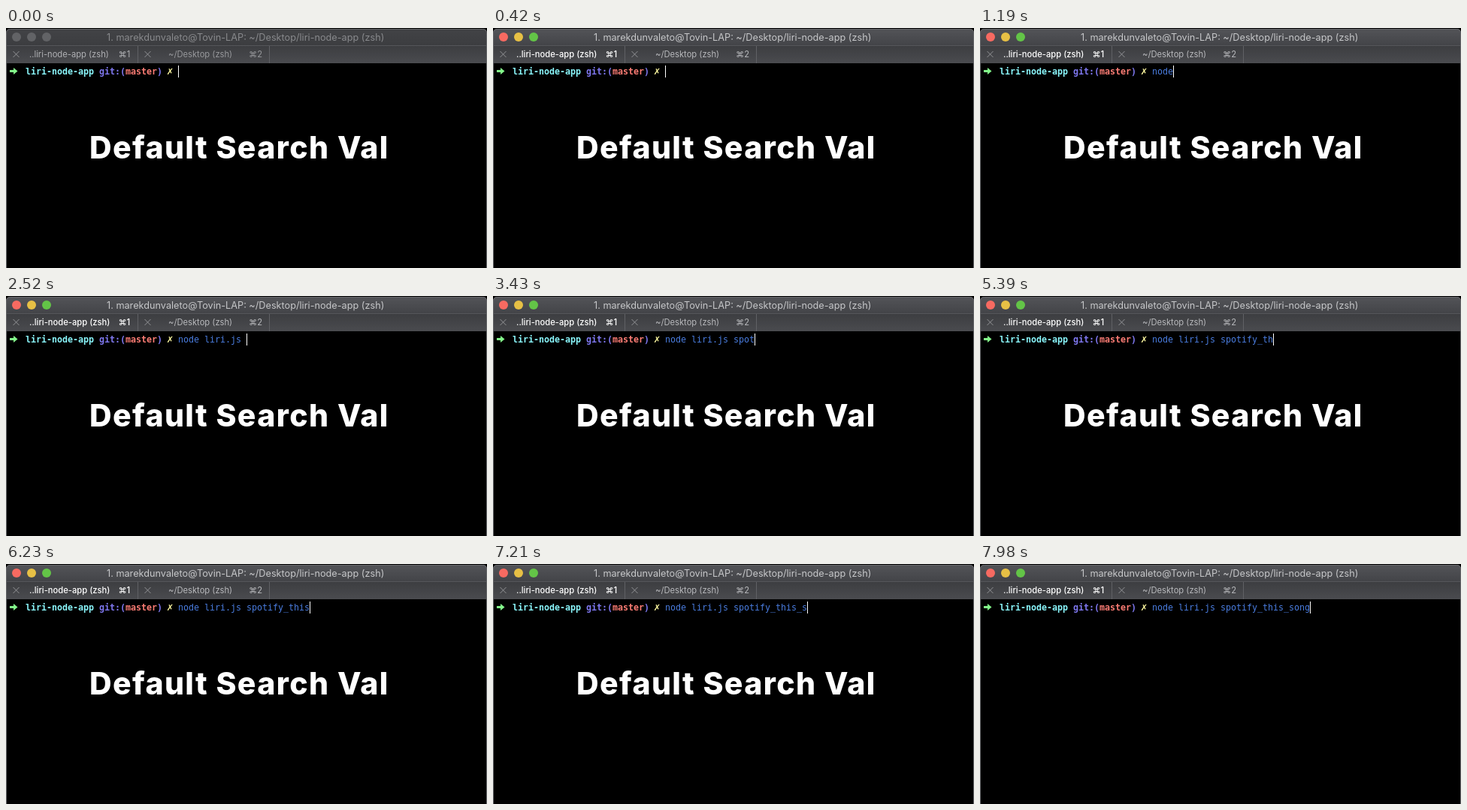
These frames come from a looping animation (640x320 px, 8 s). An HTML page with a canvas:

```html
<!DOCTYPE html>
<html lang="en">
<head>
<meta charset="utf-8">
<title>Terminal</title>
<style>
html, body { margin: 0; width: 100%; height: 100%; overflow: hidden; background: #000; }
canvas { display: block; width: 640px; height: 320px; }
</style>
</head>
<body>
<canvas id="stage" width="640" height="320"></canvas>
<script>
const ctx = document.getElementById('stage').getContext('2d');
const LOOP = 8000, FOCUS = 350, CAPTION_END = 7630;
const UI = 'Inter, "Open Sans", sans-serif';
const MONO = '"DejaVu Sans Mono", monospace';
const LEFT = 5, CELL = 7, BASE = 62;

const command = 'node liri.js spotify_this_song';
const keyTimes = [
  770, 910, 1050, 1190, 1400,
  1540, 1610, 1750, 1820, 1960, 2100, 2170, 2520,
  2940, 3150, 3290, 3430, 3640, 3850, 4060, 4410,
  4760, 5180, 5670, 6020, 6580, 7210, 7350, 7490, 7630
];

// column, text, colour
const prompt = [
  [3, 'liri-node-app', '#8af6fb'],
  [17, 'git:(', '#7f78f0'],
  [22, 'master', '#fb7c74'],
  [28, ')', '#7f78f0']
];

function rect(x, y, w, h, fill) {
  ctx.fillStyle = fill;
  ctx.fillRect(x, y, w, h);
}

function shade(y, h, top, bottom) {
  const g = ctx.createLinearGradient(0, y, 0, y + h);
  g.addColorStop(0, top);
  g.addColorStop(1, bottom);
  rect(0, y, 640, h, g);
}

function text(str, x, y, font, fill, spacing = 0) {
  ctx.font = font;
  ctx.letterSpacing = spacing + 'px';
  ctx.fillStyle = fill;
  ctx.fillText(str, x, y);
}

function mono(col, str, fill, weight) {
  const font = weight + ' 11.63px ' + MONO;
  [...str].forEach((ch, i) => text(ch, LEFT + (col + i) * CELL, BASE, font, fill));
}

function closeMark(x, y) {
  ctx.strokeStyle = '#929396';
  ctx.lineWidth = 1;
  ctx.beginPath();
  ctx.moveTo(x - 4, y - 4);
  ctx.lineTo(x + 4, y + 4);
  ctx.moveTo(x + 4, y - 4);
  ctx.lineTo(x - 4, y + 4);
  ctx.stroke();
}

function titleBar(active) {
  if (active) shade(1, 22, '#535458', '#434448');
  else shade(1, 22, '#424346', '#3c3d40');

  const lights = active ? ['#f76a61', '#e7c045', '#63c447'] : Array(3).fill('#626366');
  lights.forEach((c, i) => {
    ctx.fillStyle = c;
    ctx.beginPath();
    ctx.arc(14 + i * 20, 12, 6, 0, Math.PI * 2);
    ctx.fill();
  });
  text('1. marekdunvaleto@Tovin-LAP: ~/Desktop/liri-node-app (zsh)', 134, 17,
    '12.7px ' + UI, active ? '#c6c7c9' : '#88898c');
}

function tabBar(active) {
  shade(23, 24, '#3c3d40', '#4a4b4f');
  rect(0, 23, 640, 1, '#55565a');
  rect(175, 24, 1, 23, '#606165');
  rect(350, 24, 1, 23, '#606165');
  closeMark(13.5, 35);
  closeMark(188.5, 35);
  const front = active ? '#fff' : '#b0b1b4';
  const back = active ? '#b8b9bc' : '#97989b';
  const size = '11.2px ' + UI;
  const frontFont = (active ? '500 ' : '') + size;
  text('..liri-node-app (zsh)', 31, 39, frontFont, front);
  text('⌘1', 149.5, 39, frontFont, front);
  text('~/Desktop (zsh)', 216, 39, size, back);
  text('⌘2', 323, 39, size, back);
}

function arrow(x, y) {
  rect(x, y - 1.5, 6, 3, '#83f98a');
  ctx.beginPath();
  ctx.moveTo(x + 5, y - 4.5);
  ctx.lineTo(x + 10.5, y);
  ctx.lineTo(x + 5, y + 4.5);
  ctx.fill();
}

function windowEdge() {
  ctx.strokeStyle = '#66676a';
  ctx.lineWidth = 1;
  ctx.beginPath();
  ctx.roundRect(0.5, 1.5, 639, 330, 5);
  ctx.stroke();
}

function draw(t) {
  const active = t >= FOCUS;
  const typed = keyTimes.filter(k => k <= t).length;

  rect(0, 0, 640, 320, '#000');
  ctx.save();
  ctx.beginPath();
  ctx.roundRect(0, 1, 640, 330, 5);
  ctx.clip();
  titleBar(active);
  tabBar(active);
  ctx.restore();
  windowEdge();

  arrow(LEFT, 57.5);
  prompt.forEach(([col, str, fill]) => mono(col, str, fill, 'bold'));
  text('✗', 214, BASE, 'bold 14px ' + MONO, '#fdf9a0');
  mono(32, command.slice(0, typed), '#4a7de0', 'normal');
  rect(229 + typed * CELL, 50, 1, 16, '#fff');

  if (t < CAPTION_END) {
    text('Default Search Val', 111, 174, '800 41px ' + UI, '#fff', 1.4);
  }
}

function frame(now) {
  draw(now % LOOP);
  requestAnimationFrame(frame);
}

draw(0);
requestAnimationFrame(frame);
</script>
</body>
</html>
```
